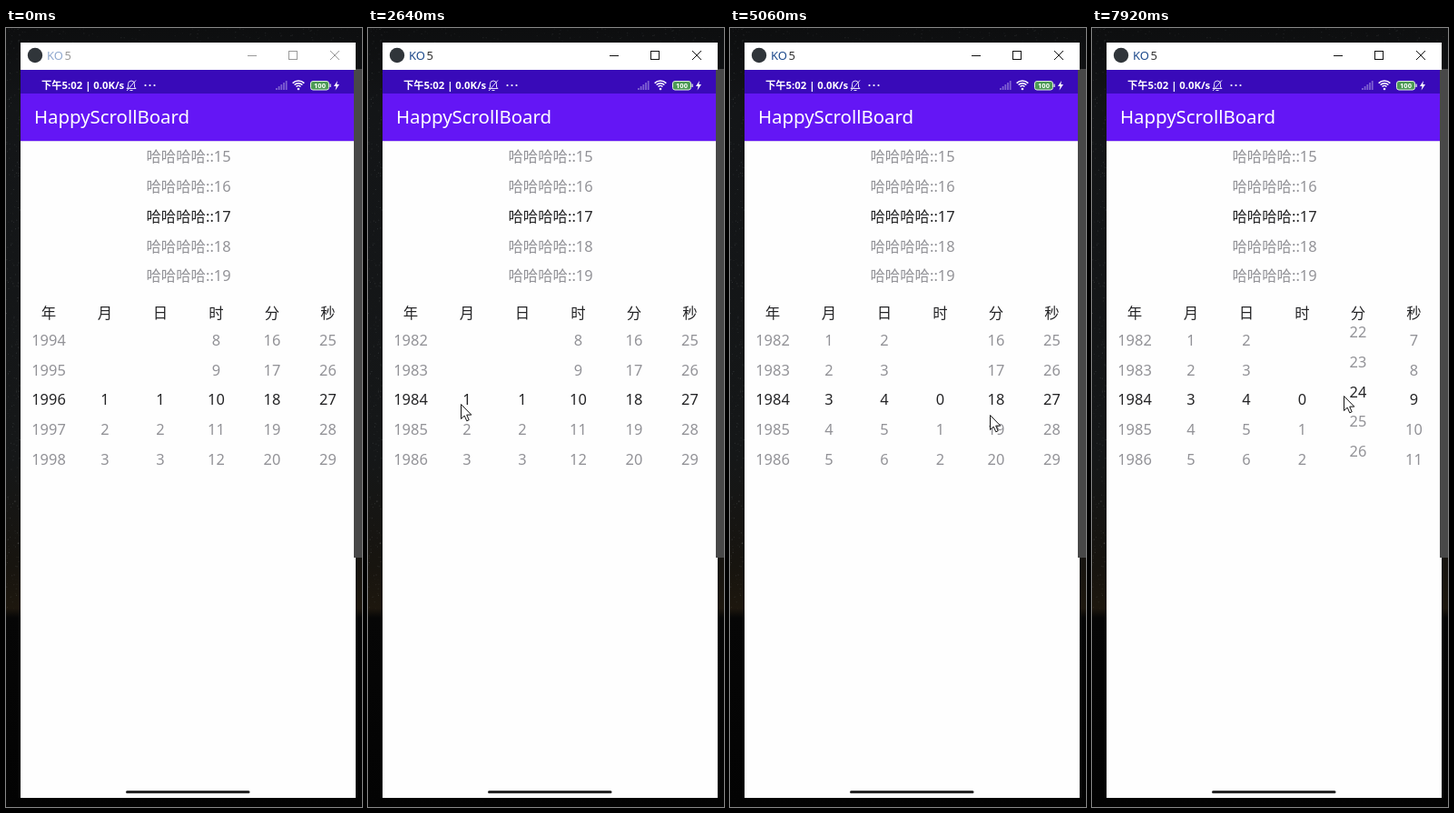
Write an HTML page with a canvas that moves like this. It is 392 px wide and 856 px high and loops after 8 s.

```html
<!DOCTYPE html>
<html lang="zh">
<head>
<meta charset="utf-8">
<style>
html, body { margin: 0; width: 100%; height: 100%; overflow: hidden; background: #0c0d0e; }
canvas { display: block; width: 392px; height: 856px; }
</style>
</head>
<body>
<canvas id="stage" width="392" height="856"></canvas>
<script>
const W = 392, H = 856, LOOP = 8000;
const ctx = document.getElementById('stage').getContext('2d');
const FONT = '"Noto Sans", "Noto Sans CJK SC", "Noto Sans CJK", sans-serif';
const GREY = '#929297', DARK = '#242426';
const ROW = 32.8, MID = 408.5;

const BURSTS = [[200, 1020], [1420, 1000], [2640, 1020], [3860, 1000], [5060, 1040], [6300, 1000], [7520, 1000]];

// Pointer turning points: [step, x, y]
const PATH = [
  [1, 150, 690], [4, 45, 402], [6, 39, 379], [8, 40, 488], [10, 40, 393], [11, 42, 470],
  [12, 95, 440], [14, 108, 385], [16, 167, 460], [17, 168, 375], [18, 226, 432], [20, 228, 491],
  [21, 227, 425], [22, 228, 482], [24, 284, 426], [25, 286, 425], [27, 295, 370], [28, 361, 405],
  [30, 357, 499], [31, 355, 499], [33, 362, 440], [34, 363, 522], [36, 291, 455], [37, 288, 400],
  [39, 277, 404]
];

// Steps during which the button is held
const DRAGS = [[6, 8], [10, 11], [14, 14], [16, 19], [21, 22], [27, 29], [33, 34], [36, 37]];

function wheel(label, x, min, max, ...track) {
  return { label, x, min, max, track };
}

const YEAR = wheel('年', 47, 1900, 2100, [6, 1996], [8, 1992.7], [9, 1988.3], [10, 1988], [12, 1984]);
const MONTH = wheel('月', 109, 1, 12, [13, 1], [14, 2.8], [15, 3]);
const DAY = wheel('日', 170, 1, 31, [16, 1], [17, 3.5], [18, 4]);
const HOUR = wheel('时', 231.5, 0, 23, [18, 10], [22, 2.2], [23, 0.2], [24, 0]);
const MINUTE = wheel('分', 293, 0, 59, [26, 18], [28, 20], [36, 20], [37, 21.7], [39, 24.27]);
const SECOND = wheel('秒', 354.5, 0, 59, [28, 27], [29, 25.5], [31, 17.8], [32, 16], [33, 16], [36, 9]);
const WHEELS = [YEAR, MONTH, DAY, HOUR, MINUTE, SECOND];

function stepAt(t) {
  let step = 0;
  BURSTS.forEach(([start, span], i) => {
    if (t >= start) step = 1 + 6 * i + Math.min(5, Math.floor((t - start) / (span / 5)));
  });
  return Math.min(39, step);
}

// Linear value of column `col` in a list of keys whose first column is the step
function valueAt(keys, step, col = 1) {
  const next = keys.findIndex(k => k[0] >= step);
  if (next < 0) return keys[keys.length - 1][col];
  if (next === 0) return keys[0][col];
  const a = keys[next - 1], b = keys[next];
  return a[col] + (b[col] - a[col]) * (step - a[0]) / (b[0] - a[0]);
}

function rect(x, y, w, h, fill) {
  ctx.fillStyle = fill;
  ctx.fillRect(x, y, w, h);
}

function disc(x, y, r, fill) {
  ctx.fillStyle = fill;
  ctx.beginPath();
  ctx.arc(x, y, r, 0, Math.PI * 2);
  ctx.fill();
}

function text(str, x, y, size, fill, align = 'center', weight = 400) {
  ctx.font = `${weight} ${size}px ${FONT}`;
  ctx.textAlign = align;
  ctx.fillStyle = fill;
  ctx.fillText(str, x, y);
}

function line(points, color, width = 1, close = false) {
  ctx.beginPath();
  points.forEach(([x, y]) => ctx.lineTo(x, y));
  if (close) ctx.closePath();
  ctx.strokeStyle = color;
  ctx.lineWidth = width;
  ctx.stroke();
}

function pill(x, y, w, h, r) {
  ctx.beginPath();
  ctx.roundRect(x, y, w, h, r);
}

function drawWallpaper() {
  const sky = ctx.createLinearGradient(0, 0, 0, H);
  [[0, '#0d0e0f'], [0.1, '#131517'], [0.55, '#151718'], [0.69, '#17140f'],
   [0.745, '#1d170e'], [0.757, '#060606'], [1, '#030303']].forEach(([p, c]) => sky.addColorStop(p, c));
  rect(0, 0, W, H, sky);
  let seed = 7;
  const rnd = () => (seed = seed * 16807 % 2147483647) / 2147483647;
  for (let i = 0; i < 260; i++) {
    const y = rnd() * 640, x = rnd() * 15, light = rnd();
    rect(x, y, 1, 1, `rgba(150,155,155,${0.05 + 0.2 * light})`);
  }
  for (let i = 0; i < 120; i++) rect(rnd() * W, rnd() * 15, 1.5, 1, `rgba(150,155,155,${0.15 * rnd()})`);
}

function drawTitleBar(active) {
  rect(16, 16, 369, 30, '#fff');
  disc(32, 30, 8.2, '#30353a');
  text('KO', 45, 35, 13, active ? '#1d4a8c' : '#90a9cf', 'left');
  text('5', 72, 35, 13, active ? '#333' : '#9a9a9a', 'right');
  const c = active ? '#111' : '#999';
  line([[266, 30.5], [276, 30.5]], c);
  ctx.strokeRect(311.5, 25.5, 9, 9);
  line([[357, 25], [367, 35]], c);
  line([[367, 25], [357, 35]], c);
}

function drawBell(x, y) {
  const color = '#e6e0fa';
  ctx.strokeStyle = color;
  ctx.lineWidth = 1;
  ctx.beginPath();
  ctx.moveTo(x - 5, y + 3.5);
  ctx.lineTo(x - 3.5, y + 2);
  ctx.lineTo(x - 3.5, y - 1.5);
  ctx.arc(x, y - 1.5, 3.5, Math.PI, 0);
  ctx.lineTo(x + 3.5, y + 2);
  ctx.lineTo(x + 5, y + 3.5);
  ctx.closePath();
  ctx.stroke();
  line([[x - 1.5, y + 5.5], [x + 1.5, y + 5.5]], color);
  line([[x - 5, y + 6], [x + 5, y - 5.5]], color);
}

function drawStatusBar() {
  rect(16, 46, 368, 26, '#390ab9');
  text('下午5:02 | 0.0K/s', 39, 67, 11.3, '#fff', 'left', 600);
  drawBell(138, 63);
  for (let i = 0; i < 3; i++) disc(153.5 + i * 5, 63, 1.1, '#fff');
  for (let i = 0; i < 5; i++) rect(297 + i * 2.7, 66 - i * 2, 1.8, 2 + i * 2, 'rgba(255,255,255,.35)');

  ctx.strokeStyle = '#fff';
  ctx.lineWidth = 1.5;
  for (let r = 3.5; r < 10; r += 2.75) {
    ctx.beginPath();
    ctx.arc(322, 67, r, -Math.PI * 0.75, -Math.PI * 0.25);
    ctx.stroke();
  }
  disc(322, 67, 1.3, '#fff');

  pill(335.5, 58.5, 20, 9.5, 2.5);
  ctx.fillStyle = '#4d9a55';
  ctx.fill();
  ctx.strokeStyle = '#dff0df';
  ctx.lineWidth = 1;
  ctx.stroke();
  rect(356.5, 61.5, 1.3, 3.5, '#dff0df');
  text('100', 345.5, 66.1, 7.5, '#fff', 'center', 700);

  ctx.fillStyle = '#fff';
  ctx.fill(new Path2D('M365 58l-4 6h2.6l-1 4.5 4.4-6.5h-2.7z'));
}

function drawScreen() {
  rect(16, 46, 369, 800, '#fefefe');
  rect(16, 72, 368, 52, '#6416f5');
  rect(16, 124, 368, 1, '#d9cdf2');
  drawStatusBar();
  text('HappyScrollBoard', 31, 105, 20.4, '#fff', 'left', 500);
  for (let i = 0; i < 5; i++) {
    text('哈哈哈哈::' + (15 + i), 201, 147.2 + i * ROW, 16.4, i === 2 ? DARK : GREY);
  }
  pill(132, 838, 136.5, 3, 1.5);
  ctx.fillStyle = '#262626';
  ctx.fill();
  rect(383, 45, 9, 537, '#484848');
}

function drawWheel({ label, x, min, max, track }, step) {
  text(label, x, 319, 16.4, DARK);
  const pos = valueAt(track, step), near = Math.round(pos);
  ctx.save();
  ctx.beginPath();
  ctx.rect(x - 30, 327, 60, 164);
  ctx.clip();
  for (let v = Math.max(min, near - 3); v <= Math.min(max, near + 3); v++) {
    text(String(v), x, MID + (v - pos) * ROW + 5.9, 16.4, v === near ? DARK : GREY);
  }
  ctx.restore();
}

const ARROW = new Path2D('M.5 .5v16l3.7-3.4 2.6 5.7 2.4-1.1-2.5-5.6h5.1z');

function drawPointer(step) {
  if (step < 1) return;
  const x = Math.round(valueAt(PATH, step, 1)), y = Math.round(valueAt(PATH, step, 2));
  if (DRAGS.some(([from, to]) => step >= from && step <= to)) {
    ctx.globalCompositeOperation = 'multiply';
    disc(x, y, 12.3, '#fffc78');
    ctx.globalCompositeOperation = 'source-over';
  }
  ctx.save();
  ctx.translate(x, y);
  ctx.fillStyle = '#fff';
  ctx.fill(ARROW);
  ctx.strokeStyle = '#111';
  ctx.lineWidth = 1;
  ctx.stroke(ARROW);
  ctx.restore();
}

function draw(now) {
  const step = stepAt(now % LOOP);
  drawWallpaper();
  drawScreen();
  drawTitleBar(step >= 6);
  WHEELS.forEach(w => drawWheel(w, step));
  drawPointer(step);
}

const begin = performance.now();
function tick() {
  draw(performance.now() - begin);
  requestAnimationFrame(tick);
}
tick();
</script>
</body>
</html>
```
